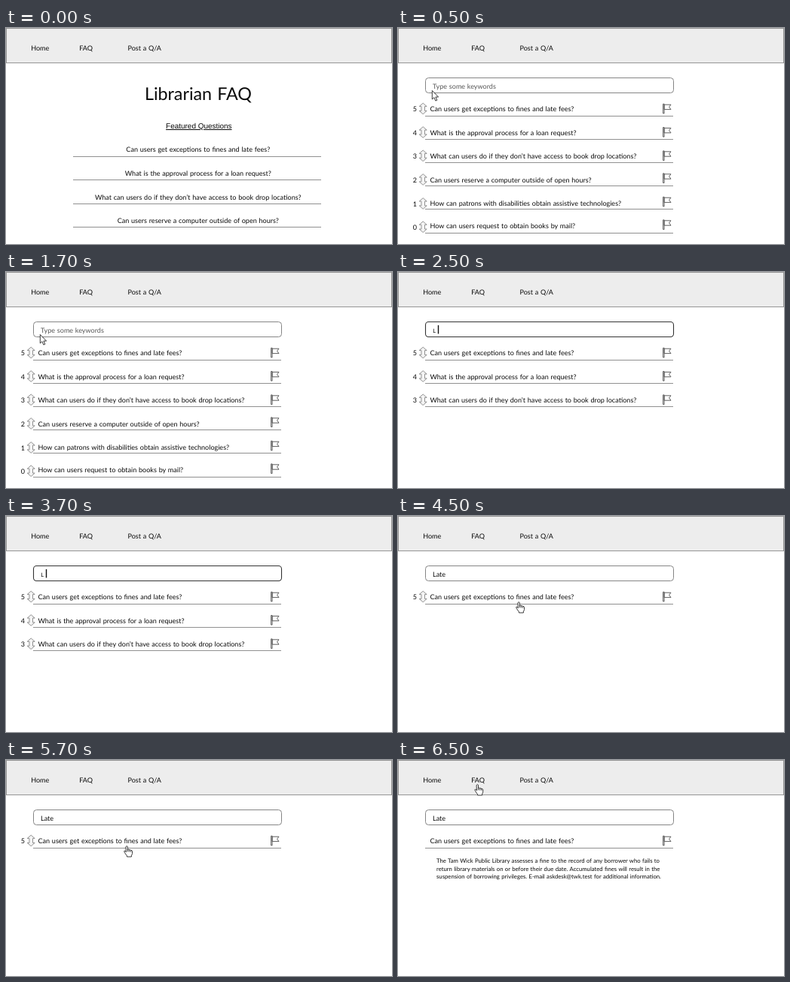
Write an HTML page that moves like this. It is 512 px wide and 288 px high and loops after 8 s.

```html
<!DOCTYPE html>
<html lang="en">
<head>
<meta charset="utf-8">
<title>Librarian FAQ</title>
<style>
  html, body { margin: 0; width: 100%; height: 100%; overflow: hidden; background: #fff; }
  svg { display: block; width: 100vw; height: 100vh; }
  text {
    font: 9.06px Lato, Carlito, sans-serif;
    word-spacing: .05em;
    text-rendering: geometricPrecision;
    fill: #0a0a0a;
    white-space: pre;
  }
  .title { font-size: 23.3px; }
  .sub {
    font: 9.96px "Liberation Sans", Arial, sans-serif;
    word-spacing: 0;
    text-decoration: underline;
  }
  .hint { fill: #555; }
  .key { font-size: 7.4px; }
  .answer { font-size: 7.72px; }
  .mid { text-anchor: middle; }
  .rule { stroke: #909090; stroke-width: 1; }
  .box { fill: #fff; stroke: #858585; stroke-width: 1; }
  .focus { stroke: #333; stroke-width: 1.1; }
  .arrow { fill: #f4f4f4; stroke: #858585; stroke-width: .9; stroke-linejoin: round; }
  .flag { fill: #fff; stroke: #444; stroke-width: .85; stroke-linejoin: round; }
  .pointer { fill: #fff; stroke: #222; stroke-width: .9; stroke-linejoin: round; stroke-linecap: round; }
</style>
</head>
<body>
<svg id="stage" viewBox="0 0 512 288"></svg>
<script>
const LOOP = 8000;
const questions = [
  "Can users get exceptions to fines and late fees?",
  "What is the approval process for a loan request?",
  "What can users do if they don’t have access to book drop locations?",
  "Can users reserve a computer outside of open hours?",
  "How can patrons with disabilities obtain assistive technologies?",
  "How can users request to obtain books by mail?"
];
const answer = [
  "The Tam Wick Public Library assesses a fine to the record of any borrower who fails to",
  "return library materials on or before their due date. Accumulated fines will result in the",
  "suspension of borrowing privileges. E-mail askdesk@twk.test for additional information."
];

const text = (x, y, s, cls = "") => `<text class="${cls}" x="${x}" y="${y}">${s}</text>`;
const rule = (x1, x2, y) => `<path class="rule" d="M${x1} ${y}H${x2}"/>`;
const shape = (cls, x, y, d) => `<path class="${cls}" transform="translate(${x} ${y})" d="${d}"/>`;

const arrow = y => shape("arrow", 33.2, y,
  "M0-7.3L5-2.9H2.3V2.9H5L0 7.3L-5 2.9H-2.3V-2.9H-5Z");
const flag = y => shape("flag", 351.6, y,
  "M0-6.3H1.5V6.3H0ZM1.5-5.4H10.4L8-2.3L10.4 1H1.5Z");
const mouse = (x, y) => shape("pointer", x, y,
  "M0 0V11.2L2.6 8.9L4.6 13.3L6.5 12.4L4.6 8.2H7.9Z");
const hand = (x, y) => shape("pointer", x, y,
  "M-1.1 1Q0-.6 1.1 1V5.2Q2.1 4.2 3.2 5.5Q4.4 4.7 5.4 6Q7 5.6 7.3 7.2" +
  "V10Q7.3 11.6 6.2 12.8V14.6H.2V13.3Q-1.2 11.8-2.6 9.3Q-4.3 7-2.9 6.6Q-1.9 6.5-1.1 8Z" +
  "M1.1 5.2V7.5M3.2 5.5V7.7M5.4 6V7.9");

const search = (inner, cls = "") =>
  `<rect class="box ${cls}" x="36.5" y="66.5" width="329" height="20" rx="4"/>` + inner;

const textY = [111, 142.5, 174.2, 205.6, 237.2, 266.8];
const countY = [111, 142.6, 174.2, 205.8, 237.6, 269.4];
const arrowY = [107.5, 139, 170.3, 202, 234, 265.2];
const flagY = [107.6, 138.8, 170.2, 200.2, 231.6, 262.2];
const ruleY = (top, step, i) => top + Math.round(step * i);

const entry = i =>
  text(42.5, textY[i], questions[i]) + flag(flagY[i]) + rule(36, 365, ruleY(117.5, 31.1, i));
const ranked = i => text(19.8, countY[i], 5 - i) + arrow(arrowY[i]) + entry(i);
const list = n => questions.slice(0, n).map((_, i) => ranked(i)).join("");

const nav = `<rect x=".5" y=".5" width="511" height="46" fill="#ededed" stroke="#959595"/>` +
  text(33.2, 29.6, "Home") + text(97.2, 29.6, "FAQ") + text(161.5, 29.6, "Post a Q/A");

const late = search(text(46, 80.6, "Late"));

const home = text(255, 96.3, "Librarian FAQ", "title mid") +
  text(255.8, 134, "Featured Questions", "sub mid") +
  questions.slice(0, 4).map((q, i) =>
    text(254.8, 165.4 + i * 31.6, q, "mid") + rule(89, 418, ruleY(171.5, 31.3, i))).join("");

const scenes = [
  [0, home],
  [500, search(text(46, 80.6, "Type some keywords", "hint")) + list(6) + mouse(45.3, 83.8)],
  [2500, search(text(46.2, 80.8, "L", "key") +
    `<path d="M53.5 71V82.4" stroke="#111" stroke-width="1.4"/>`, "focus") + list(3)],
  [4500, late + list(1) + hand(160.2, 114.4)],
  [6500, late + entry(0) + hand(105.4, 32.4) +
    answer.map((s, i) => text(51, 137.4 + i * 10.2, s, "answer")).join("")]
];

const stage = document.getElementById("stage");
stage.innerHTML = nav + scenes.map(s => `<g visibility="hidden">${s[1]}</g>`).join("");
const groups = [...stage.querySelectorAll("g")];
const start = performance.now();
let shown = -1;

function draw(now) {
  const t = Math.max(0, now - start) % LOOP;
  const current = scenes.filter(s => s[0] <= t).length - 1;
  if (current !== shown) {
    groups.forEach((g, i) => g.setAttribute("visibility", i === current ? "visible" : "hidden"));
    shown = current;
  }
  requestAnimationFrame(draw);
}
draw(start);
</script>
</body>
</html>
```
